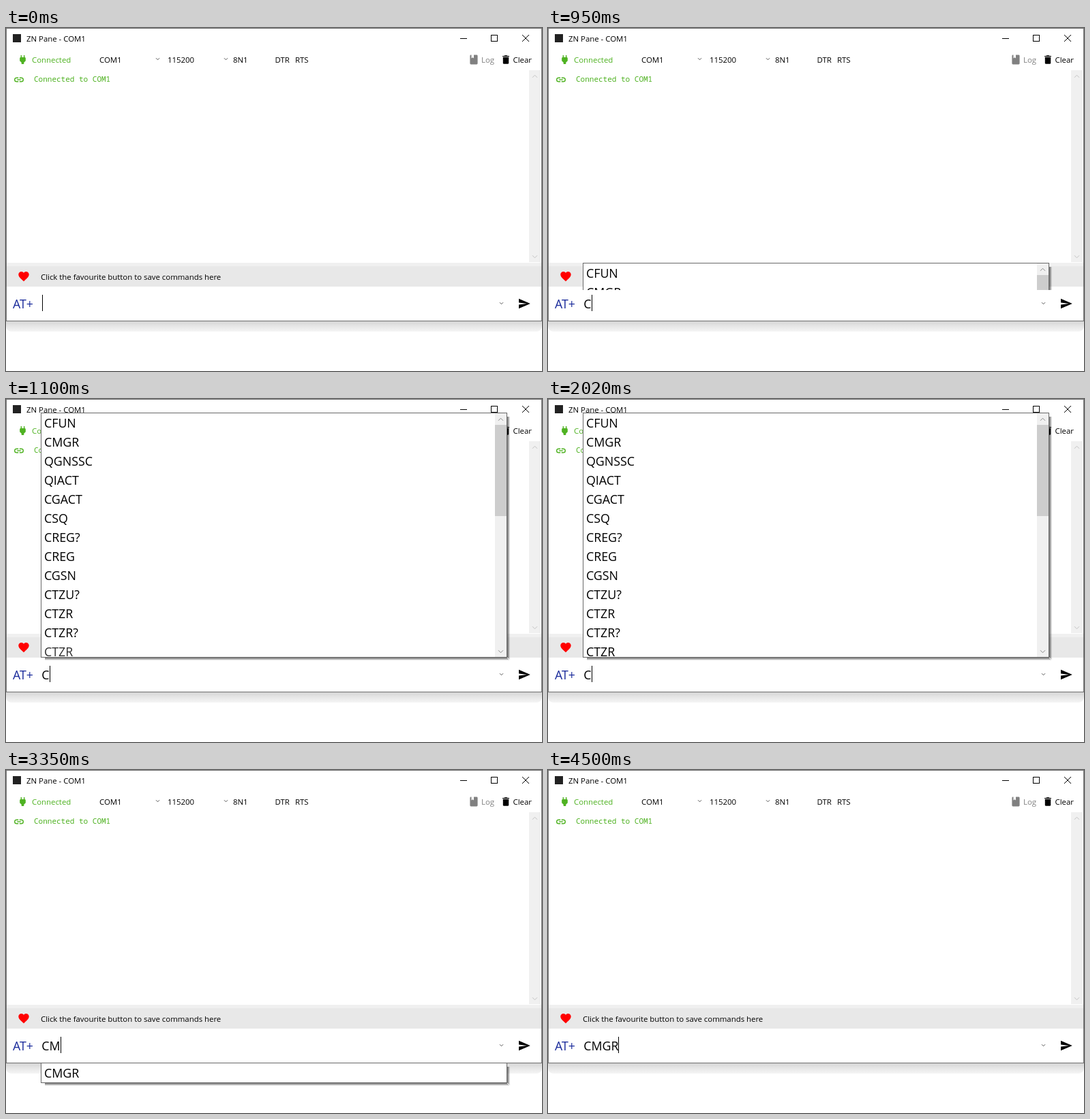
Animation of 786x504 px, one loop 4980 ms. Source, as an HTML page with a canvas:

```html
<!DOCTYPE html>
<html lang="en">
<head>
<meta charset="utf-8">
<title>Serial terminal</title>
<style>
html, body { margin: 0; width: 100%; height: 100%; overflow: hidden; background: #fff; }
canvas { display: block; }
</style>
</head>
<body>
<canvas id="stage" width="786" height="504"></canvas>
<script>
const ctx = document.getElementById('stage').getContext('2d');
const LOOP = 4980;
const SMALL = '11.4px "Open Sans", "Noto Sans", sans-serif';
const LARGE = '17.8px "Open Sans", "Noto Sans", sans-serif';
const MONO = '11px "Noto Sans Mono", monospace';
const GREEN = '#4fb222';
const COMMANDS = ['CFUN', 'CMGR', 'QGNSSC', 'QIACT', 'CGACT', 'CSQ', 'CREG?', 'CREG',
  'CGSN', 'CTZU?', 'CTZR', 'CTZR?', 'CTZR'];

// Icons on a 24 unit grid
const ICONS = {
  plug: 'M16 7V3H14V7H10V3H8V7C7 7 6 8 6 9V14.5L9.5 18V21H14.5V18L18 14.5V9C18 8 17 7 16 7Z',
  heart: 'M12 21.3L10.5 20C5.4 15.4 2 12.3 2 8.5C2 5.4 4.4 3 7.5 3C9.2 3 10.9 3.8 12 5.1C13.1 3.8 14.8 3 16.5 3C19.6 3 22 5.4 22 8.5C22 12.3 18.6 15.4 13.5 20Z',
  send: 'M2 21L23 12L2 3V10L17 12L2 14Z',
  bin: 'M19 4H15.5L14.5 3H9.5L8.5 4H5V6H19ZM6 19A2 2 0 0 0 8 21H16A2 2 0 0 0 18 19V7H6Z',
  book: 'M18 22A2 2 0 0 0 20 20V4A2 2 0 0 0 18 2H12V9L9.5 7.5L7 9V2H6A2 2 0 0 0 4 4V20A2 2 0 0 0 6 22Z'
};

function rect(x, y, w, h, color) {
  ctx.fillStyle = color;
  ctx.fillRect(x, y, w, h);
}

function frame(x, y, w, h, color) {
  ctx.strokeStyle = color;
  ctx.lineWidth = 1;
  ctx.strokeRect(x + 0.5, y + 0.5, w - 1, h - 1);
}

function text(str, x, y, font = SMALL, color = '#000') {
  ctx.font = font;
  ctx.fillStyle = color;
  ctx.fillText(str, x, y);
}

function line(points, color, width = 1) {
  ctx.beginPath();
  points.forEach(([x, y]) => ctx.lineTo(x, y));
  ctx.strokeStyle = color;
  ctx.lineWidth = width;
  ctx.stroke();
}

function icon(name, cx, cy, scale, color) {
  ctx.save();
  ctx.translate(cx, cy);
  ctx.scale(scale, scale);
  ctx.translate(-12, -12);
  ctx.fillStyle = color;
  ctx.fill(new Path2D(ICONS[name]));
  ctx.restore();
}

function linkIcon(cx, cy) {
  ctx.strokeStyle = GREEN;
  ctx.lineWidth = 1.4;
  for (const side of [-1, 1]) {
    ctx.beginPath();
    ctx.moveTo(cx + side * 0.8, cy - 2.8);
    ctx.lineTo(cx + side * 3.5, cy - 2.8);
    ctx.arc(cx + side * 3.5, cy, 2.8, -Math.PI / 2, Math.PI / 2, side < 0);
    ctx.lineTo(cx + side * 0.8, cy + 2.8);
    ctx.stroke();
  }
  line([[cx - 2.8, cy], [cx + 2.8, cy]], GREEN, 1.4);
}

// dir: 1 points down, -1 points up
function chevron(cx, cy, size, dir, color, width = 1) {
  line([[cx - size, cy - dir * size / 2], [cx, cy + dir * size / 2], [cx + size, cy - dir * size / 2]], color, width);
}

function windowShadow() {
  const fade = ctx.createLinearGradient(0, 430, 0, 446);
  fade.addColorStop(0, '#d2d2d2');
  fade.addColorStop(0.5, '#e6e6e6');
  fade.addColorStop(1, '#f5f5f5');
  ctx.fillStyle = fade;
  ctx.beginPath();
  ctx.roundRect(0, 420, 786, 26, 8);
  ctx.fill();
}

function titleBar() {
  rect(10, 9, 12, 12, '#222');
  text('ZN Pane - COM1', 30, 20);
  rect(666, 15, 10, 1, '#000');
  frame(711, 10, 10, 10, '#000');
  line([[757, 10], [767, 20]], '#000');
  line([[767, 10], [757, 20]], '#000');
}

function toolBar() {
  icon('plug', 24.5, 46.5, 0.72, GREEN);
  text('Connected', 38, 51, SMALL, GREEN);
  text('COM1', 137, 51);
  chevron(222.5, 45.5, 2.5, 1, '#555');
  text('115200', 237, 51);
  chevron(322.5, 45.5, 2.5, 1, '#555');
  text('8N1', 333, 51);
  text('DTR', 394.5, 51);
  text('RTS', 424, 51);
  icon('book', 686, 46.5, 0.7, '#808080');
  text('Log', 697, 51, SMALL, '#808080');
  icon('bin', 733, 46.5, 0.7, '#000');
  text('Clear', 743.5, 51);
}

function mainWindow() {
  windowShadow();
  rect(0, 0, 786, 431, '#fff');
  titleBar();
  toolBar();
  linkIcon(19, 76);
  text('Connected to COM1', 41, 79, MONO, GREEN);
  rect(767, 62, 17, 282, '#f0f0f0');
  chevron(775.5, 71, 3.5, -1, '#c3c3c3');
  chevron(775.5, 336, 3.5, 1, '#c3c3c3');
  rect(1, 345, 784, 5, '#f0f0f0');
  rect(1, 350, 784, 30, '#e8e8e8');
  icon('heart', 26, 365, 0.77, '#f00');
  text('Click the favourite button to save commands here', 51, 370);
  text('AT+', 10, 412, LARGE, '#1a2b9b');
  chevron(726.5, 404.5, 2.5, 1, '#555');
  icon('send', 760, 405, 0.8, '#000');
  frame(0, 0, 786, 431, '#707070');
}

function panel(y, height) {
  [0.48, 0.4, 0.25, 0.1].forEach((alpha, i) => {
    const shade = `rgba(0,0,0,${alpha})`;
    rect(735 + i, y + 6, 1, height - 6 + i, shade);
    rect(57, y + height + i, 678 + i, 1, shade);
  });
  rect(51, y, 684, height, '#fff');
  frame(51, y, 684, height, '#686868');
}

function commandList(offset, lastShade) {
  ctx.save();
  ctx.beginPath();
  ctx.rect(0, 0, 786, 385);
  ctx.clip();
  ctx.translate(0, offset);
  panel(20, 360);
  rect(717, 21, 17, 358, '#f0f0f0');
  rect(717, 38, 17, 134, '#cdcdcd');
  chevron(725.5, 30, 3.5, -1, '#888');
  chevron(725.5, 371, 3.5, 1, '#888');
  ctx.beginPath();
  ctx.rect(52, 21, 665, 358);
  ctx.clip();
  COMMANDS.forEach((name, i) => {
    const shade = i === COMMANDS.length - 1 ? lastShade : 0;
    text(name, 56, 42 + 28 * i, LARGE, `rgb(${shade},${shade},${shade})`);
  });
  ctx.restore();
}

function listOffset(t) {
  return t < 1020 ? 325 : t < 1100 ? 155 : 0;
}

function fadeShade(t) {
  const step = Math.floor((t - 1480) / 80) + 1;
  return 48 - 12 * Math.max(0, Math.min(4, step));
}

function typed(t) {
  return t < 950 ? '' : t < 2190 ? 'C' : t < 3430 ? 'CM' : 'CMGR';
}

function caretX(t) {
  return t < 950 ? 53 : t < 2270 ? 64 : t < 3430 ? 80 : 103;
}

function caretVisible(t) {
  const hidden = [[150, 620], [1480, 2020], [2800, 3350], [4040, 4500]];
  return !hidden.some(([from, to]) => t >= from && t < to);
}

function draw(t) {
  rect(0, 0, 786, 504, '#fff');
  mainWindow();
  if (t >= 950 && t < 2190) commandList(listOffset(t), fadeShade(t));
  if (t >= 2190 && t < 3430) {
    panel(430, 30);
    text('CMGR', 56, 452, LARGE);
  }
  text(typed(t), 52.3, 412, LARGE);
  if (caretVisible(t)) rect(caretX(t), 392, 1, 24, '#000');
}

const start = performance.now();
function tick() {
  draw((performance.now() - start) % LOOP);
  requestAnimationFrame(tick);
}
tick();
</script>
</body>
</html>
```
